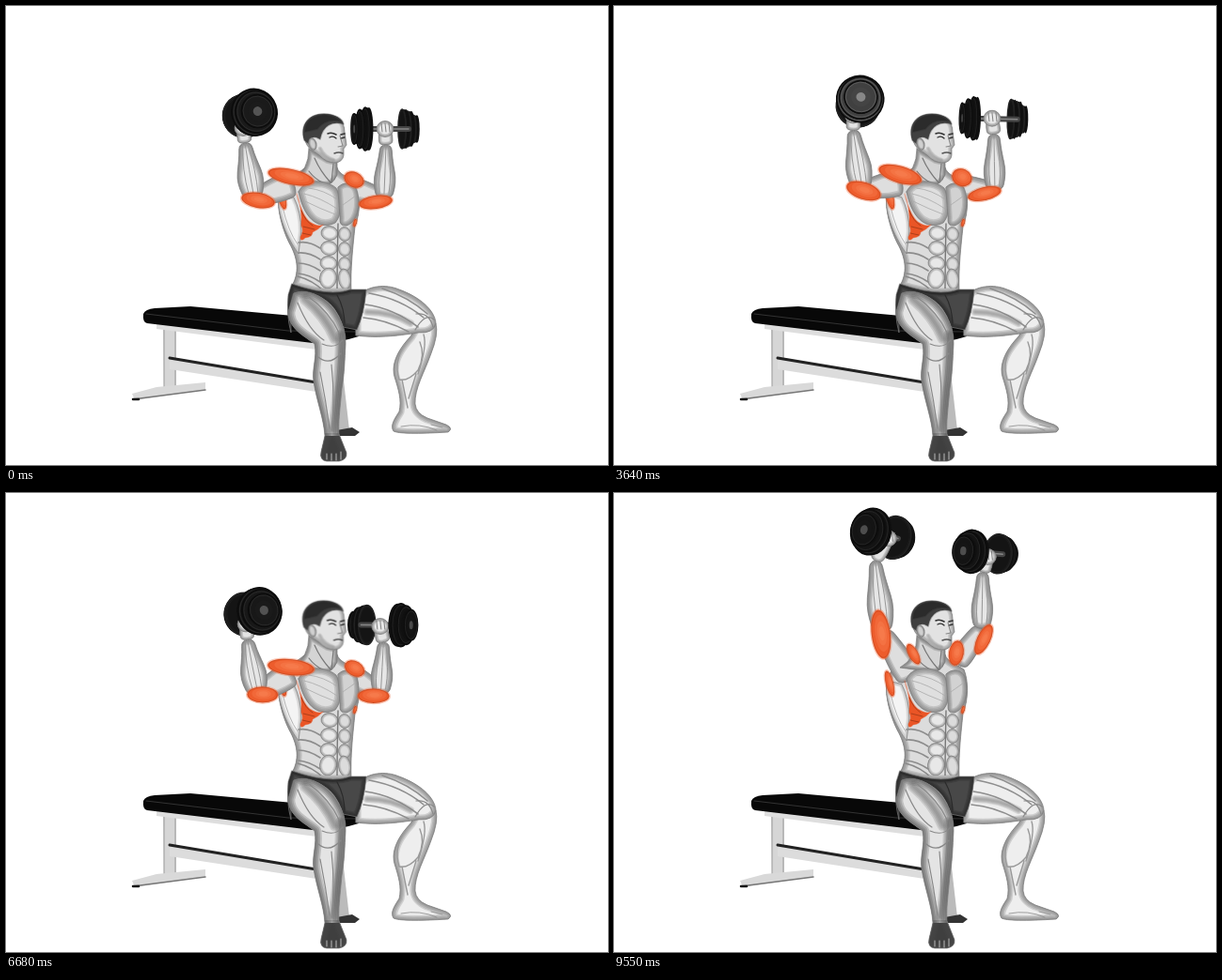
Write an HTML page with a canvas that moves like this. It is 640 by 489 pixels and loops after 9680 ms.

```html
<!DOCTYPE html>
<html lang="en">
<head>
<meta charset="utf-8">
<title>Seated dumbbell press</title>
<style>
html, body { margin: 0; width: 100%; height: 100%; overflow: hidden; background: #fff; }
canvas { display: block; width: 640px; height: 489px; }
</style>
</head>
<body>
<canvas id="stage" width="640" height="489"></canvas>
<script>
const W = 640, H = 489, LOOP = 9680, REP = 6845, STEPS = 99;
const stage = document.getElementById('stage').getContext('2d');
let g = stage;

// ---------- drawing helpers ----------
function layer(draw) {
  const c = document.createElement('canvas');
  c.width = W; c.height = H;
  g = c.getContext('2d');
  draw();
  g = stage;
  return c;
}

const toPath = p => typeof p === 'string' ? new Path2D(p) : p;

function line(p, color = '#888', width = 1) {
  g.strokeStyle = color;
  g.lineWidth = width;
  g.lineCap = g.lineJoin = 'round';
  g.stroke(toPath(p));
}

// Stroke that fades towards its sides.
function shade(p, color, width) {
  const path = toPath(p);
  g.globalAlpha = 0.24;
  for (const k of [1.6, 1.2, 0.8, 0.4]) line(path, color, width * k);
  g.globalAlpha = 1;
}

function fill(p, color, soft = 0) {
  const path = toPath(p);
  g.fillStyle = color;
  g.fill(path);
  if (soft) {
    g.globalAlpha = 0.35;
    line(path, color, soft * 2);
    g.globalAlpha = 1;
  }
}

// Light volume with soft dark edges; extra() paints inside the outline.
function muscle(p, base = '#ececec', edge = '#6d6d6d', width = 7, extra) {
  const path = toPath(p);
  fill(path, base);
  g.save();
  g.clip(path);
  if (extra) extra();
  shade(path, edge, width);
  g.restore();
  line(path, '#777', 0.7);
}

function oval(x, y, rx, ry, deg = 0) {
  const p = new Path2D();
  p.ellipse(x, y, rx, ry, deg * Math.PI / 180, 0, Math.PI * 2);
  return p;
}

function smooth(pts) {
  const p = new Path2D(), n = pts.length;
  const mid = (a, b) => [(a[0] + b[0]) / 2, (a[1] + b[1]) / 2];
  p.moveTo(...mid(pts[n - 1], pts[0]));
  pts.forEach((q, i) => p.quadraticCurveTo(...q, ...mid(q, pts[(i + 1) % n])));
  p.closePath();
  return p;
}

function limb(a, b, radii) {
  const dx = b[0] - a[0], dy = b[1] - a[1], len = Math.hypot(dx, dy) || 1;
  const side = s => radii.map((r, i) => {
    const k = i / (radii.length - 1);
    return [a[0] + dx * k - s * dy / len * r, a[1] + dy * k + s * dx / len * r];
  });
  return smooth([...side(1), ...side(-1).reverse()]);
}

function flame(x, y, rx, ry, deg) {
  fill(oval(x, y, rx, ry, deg), '#ed5c2c', 1.3);
  for (const k of [0.75, 0.5, 0.3]) {
    fill(oval(x + 1, y - 1, rx * k, ry * k, deg), 'rgba(255,150,105,.22)');
  }
  line(oval(x, y, rx * 0.95, ry * 0.95, deg), 'rgba(150,50,20,.4)', 0.8);
}

// ---------- still parts ----------
function bench() {
  fill('M167 341 L181 342 L181 408 L168 409Z', '#d6d6d6');
  line('M168 341 V409 M180 342 V408', '#9a9a9a', 1);
  fill('M174 374 L330 400 L330 411 L174 387Z', '#dcdcdc');
  line('M174 375 L330 401', '#222', 3);
  fill('M134 413 L160 406 L212 401 L212 409 L137 420Z', '#d9d9d9');
  line('M135 419 L212 409', '#777', 1.5);
  line('M135 419 L141 419', '#111', 2.5);
  fill('M340 355 L354 355 L365 452 L353 455Z', '#bbb');
  fill('M346 453 L368 449 L376 454 L371 458 L348 458Z', '#333');
  fill('M160 338 L330 358 L330 366 L160 344Z', '#dedede');
  fill('M146 328 Q148 323 158 322 L196 320 L305 330 L375 342 L375 352 Q350 360 326 359 L150 338 Q145 337 146 328Z', '#080808');
  line('M149 328 L300 346 L372 347', '#333', 1);
}

function farLeg() {
  muscle('M430 352 C418 365 409 380 413 395 C417 408 421 420 418 432 C413 440 408 447 412 453 Q420 457 470 454 Q476 450 468 446 L448 439 Q436 434 435 424 C434 408 445 390 452 370 Q460 350 457 338 L440 335Z', '#eee');
  line('M424 360 Q412 378 418 398 Q428 400 438 388 Q446 372 440 358 M421 398 L427 428 M436 392 L428 418 M444 350 Q448 362 438 392', '#999', 1.4);
  line('M452 446 L464 449 M420 448 Q440 444 458 452', '#888', 0.8);
  muscle('M372 310 C385 297 404 296 418 302 C440 310 456 324 457 338 Q455 349 438 348 C414 352 392 354 372 351Z', '#eee');
  line('M386 306 Q420 312 444 332 M382 318 Q412 322 438 342 M380 332 Q404 334 428 347 M400 301 Q428 310 448 328', '#8e8e8e', 1.6);
  shade('M384 326 Q410 326 430 338', '#888', 5);
  line('M435 345 Q446 326 455 334 M436 328 Q450 326 454 342', '#8a8a8a', 1.2);
}

function nearLeg() {
  muscle('M306 306 C320 300 342 310 352 328 Q362 344 361 360 C360 378 360 390 357 408 C355 430 353 445 354 456 L362 476 Q363 483 354 485 L341 485 Q333 484 335 475 L339 458 C338 440 330 420 327 400 C325 386 331 374 328 360 C318 352 300 344 300 326Z', '#e4e4e4', '#4a4a4a', 9, () => {
    fill('M336 458 H358 L366 490 H330Z', '#3f3f3f', 3);
    shade('M355 350 Q354 400 347 452', '#777', 6);
    shade('M318 312 Q340 330 350 354', '#777', 8);
  });
  line('M310 316 Q322 346 338 356 M322 310 Q344 326 354 348 M332 374 Q344 384 356 370 M336 360 Q350 366 358 356 M334 390 Q340 420 344 450 M346 382 Q350 420 346 452', '#888', 1.2);
  line('M341 477 V483 M346 477 V484 M351 477 V484 M356 475 V483', '#bbb', 1);
}

function shorts() {
  muscle('M304 296 Q344 310 366 302 L383 302 Q381 328 373 345 L358 342 Q352 318 332 309 Q318 305 308 316 Q302 330 303 348 Q298 330 300 308Z', '#484848', '#222', 6);
  line('M352 308 Q360 322 360 340 M304 298 Q344 312 366 304', '#2a2a2a', 1.2);
}

function trunk() {
  muscle('M322 168 C312 180 298 182 291 196 C286 212 294 240 303 256 C310 270 312 284 304 298 Q340 310 367 304 C366 280 369 255 371 235 C377 220 377 200 372 188 C364 182 354 180 352 172Z', '#dcdcdc');
  muscle('M290 200 C287 216 296 244 311 264 L314 240 Q314 220 306 204Z', '#f4f4f4', '#aaa', 4);
  line('M294 214 Q300 240 310 254', '#b5b5b5', 1);
  flame(293, 203, 4, 14, -14);
}

function chest() {
  muscle('M322 152 L342 164 L352 166 L352 180 Q346 194 334 190 L304 186 Q322 176 322 152Z', '#d4d4d4', '#666', 5);
  line('M328 162 Q334 176 345 188 M348 168 L346 188 M322 176 Q328 184 338 189', '#777', 1.2);
  muscle('M311 198 C316 184 340 184 351 194 C357 204 358 222 350 231 C336 238 318 232 311 198Z', '#dfdfdf', '#707070', 8);
  muscle('M353 193 C360 186 372 187 374 200 C377 216 372 231 362 234 Q354 235 355 226Z', '#d2d2d2', '#707070', 6);
  line('M317 200 Q334 204 352 216 M318 208 Q334 216 350 222 M322 194 Q338 196 352 206 M358 212 L372 202', '#aaa', 0.8);
  for (let i = 0; i < 4; i++) {
    const y = 242 + i * 16, h = i === 3 ? 11 : 7.5;
    muscle(oval(344 - i * 0.5, y, 9, h, 8), '#e8e8e8', '#8c8c8c', 3.5);
    muscle(oval(360, y + 1, 6.5, h, -8), '#dcdcdc', '#8c8c8c', 3);
  }
  line('M353 232 Q352 268 352 304', '#777', 1.4);
  for (let i = 0; i < 4; i++) {
    line(`M311 ${252 + i * 11} Q322 ${250 + i * 12} 334 ${258 + i * 12}`, '#8c8c8c', 1.6);
  }
  line('M310 288 Q326 292 338 304', '#888', 1.5);
  fill('M309 200 Q315 224 323 230 Q332 236 337 233 Q332 238 326 241 Q326 246 318 247 Q313 252 313 246 Q317 240 314 234 Q315 216 309 200Z', '#ea5526', 0.6);
  line('M316 235 L328 238 M315 242 L324 244 M314 218 Q318 229 326 234', '#a83b18', 0.9);
  flame(371, 231, 1.6, 4, 15);
}

function head() {
  muscle('M317 140 C314 126 322 115 338 115 C352 115 360 123 360 134 L362 148 L359 152 L359 159 Q358 166 350 167 Q340 167 333 159 L326 154 Q319 150 317 140Z', '#e2e2e2', '#888', 5);
  fill('M317 143 C312 126 322 115 338 115 C350 115 358 120 359 126 Q350 123 343 127 Q336 131 334 142 L330 140 Q323 138 322 147Z', '#404040', 0.8);
  fill('M318 134 C318 121 328 116 340 116 Q351 117 356 123 Q340 119 331 131Z', '#2b2b2b', 1);
  muscle(oval(326, 147, 4, 6.5, -15), '#d0d0d0', '#777', 2.5);
  line('M342 136 Q346 134 351 137 M356 137 L360 136', '#333', 1.6);
  line('M344 140 Q348 138 351 141 M356 141 L360 140', '#333', 1.3);
  line('M355 138 L358 149 L353 150', '#888', 1.1);
  line('M349 157 Q354 155 358 157', '#555', 1.4);
  shade('M334 152 Q338 161 348 164', '#999', 3);
}

const back = layer(() => { bench(); trunk(); farLeg(); shorts(); nearLeg(); });
const front = layer(() => {
  chest();
  g.clearRect(290, 301, 100, 60);
});
const skull = layer(head);

// ---------- moving arms ----------
// Six poses from the bottom to the top of the press.
// joints: shoulder, elbow, wrist, hand; ends: two plate stacks
// patches: shoulder and triceps as x, y, rx, ry, angle
const left = {
  radius: [25, 23],
  joints: [
    [300, 200, 281, 247, 266, 192, 266, 172],
    [306, 189, 263, 205, 254, 146, 252, 130],
    [306, 188, 263, 197, 254, 134, 254, 118],
    [318, 188, 274, 172, 261, 102, 266, 82],
    [316, 198, 285, 150, 276, 74, 290, 50],
    [314, 202, 290, 140, 287, 64, 299, 40]
  ],
  ends: [
    [291, 169, 254, 170], [265, 113, 251, 118], [262, 100, 258, 109],
    [260, 66, 278, 75], [270, 42, 300, 50], [278, 33, 312, 41]
  ],
  patches: [
    [303, 198, 25, 10, -15, 289, 242, 10, 11, -120],
    [303, 182, 25, 8, 12, 268, 207, 8, 18, -80],
    [304, 180, 24, 9, 15, 265, 198, 9, 19, -75],
    [310, 171, 18, 8, 42, 273, 174, 11, 17, -18],
    [318, 172, 12, 5, 60, 283, 152, 10, 26, -10],
    [320, 170, 12, 5, 70, 288, 143, 10, 27, 6]
  ],
  shine: [26, 34, 88, 30, 26, 30]
};
const right = {
  radius: [23, 21],
  joints: [
    [374, 200, 387, 245, 392, 198, 380, 180],
    [368, 194, 402, 205, 404, 148, 403, 131],
    [368, 192, 405, 198, 404, 138, 402, 121],
    [364, 188, 402, 170, 402, 108, 401, 92],
    [364, 182, 392, 146, 393, 86, 398, 69],
    [364, 180, 386, 136, 387, 78, 394, 63]
  ],
  ends: [
    [372, 173, 404, 174], [379, 131, 428, 131], [379, 121, 429, 122],
    [380, 91, 425, 92], [378, 64, 414, 67], [376, 53, 409, 56]
  ],
  patches: [
    [373, 194, 12, 7, 45, 383, 241, 10, 13, 120],
    [370, 185, 11, 8, 25, 393, 209, 7, 18, 82],
    [370, 183, 11, 9, 25, 394, 201, 7, 18, 78],
    [367, 176, 10, 11, 40, 394, 179, 7, 18, 52],
    [364, 171, 8, 13, 10, 394, 157, 7, 17, 25],
    [363, 168, 7, 15, 8, 388, 151, 7, 19, 28]
  ],
  shine: [26, 24, 24, 26, 26, 30]
};

// time in ms, pose
const path = [
  [0, 1], [250, 2], [700, 3], [980, 3.6], [1220, 4.2], [1500, 4.8], [1750, 5],
  [2150, 5], [2450, 4.6], [2710, 4], [2940, 3.5], [3130, 3], [3640, 2],
  [3820, 1], [4100, 0.6], [4500, 0.2], [4900, 0], [5700, 0], [6100, 0.15],
  [6410, 0.5], [REP, 1]
];

function poseAt(t) {
  const i = path.findIndex(k => k[0] > t);
  const [t0, a] = path[i - 1], [t1, b] = path[i];
  return a + (b - a) * (t - t0) / (t1 - t0);
}

function mix(rows, q) {
  const i = Math.min(4, Math.floor(q)), k = q - i;
  const lerp = (a, b) => a + (b - a) * k;
  return Array.isArray(rows[0])
    ? rows[i].map((v, j) => lerp(v, rows[i + 1][j]))
    : lerp(rows[i], rows[i + 1]);
}

// One stack of plates; (ux, uy) is the outward axis in the picture plane.
function plates([x, y], [ux, uy], r, near, lum) {
  const f = Math.min(0.985, Math.hypot(ux, uy));
  const thin = Math.sqrt(1 - f * f), turn = Math.atan2(uy, ux) * 180 / Math.PI;
  const gray = v => `rgb(${Math.round(v)},${Math.round(v)},${Math.round(v)})`;
  const at = (o, k) => oval(x + ux * o, y + uy * o, r * k * thin, r * k, turn);
  const stack = [[-7, 1], [-1, 0.9], [5, 0.7]];
  if (!near) stack.reverse();
  for (const [o, k] of stack) {
    for (let s = 0; s <= 4; s += 2) fill(at(o + (near ? s : 4 - s), k), '#101010');
    const top = o + (near ? 4 : 0), face = at(top, k);
    fill(face, gray(near ? lum * 0.75 : 20));
    line(face, gray(near ? 12 : 34), 1.6);
    line(at(top, k * 0.92), gray(near ? lum + 18 : 32), 0.7);
  }
  if (near) {
    fill(at(9, 0.42), gray(lum * 0.8));
    fill(at(9, 0.2), gray(lum + 50));
  }
}

function upperArm(arm, q) {
  const j = mix(arm.joints, q);
  const size = arm === left ? [13, 14, 13, 11, 9] : [11, 12, 11, 10, 8];
  muscle(limb(j.slice(0, 2), j.slice(2, 4), size), '#dedede', '#6b6b6b', 7);
}

function foreArm(arm, q) {
  const j = mix(arm.joints, q), e = mix(arm.ends, q), p = mix(arm.patches, q);
  const lum = mix(arm.shine, q);
  let a = e.slice(0, 2), b = e.slice(2);
  if (arm === right && q < 1) [a, b] = [b, a];
  const u = [(a[0] - b[0]) / 50, (a[1] - b[1]) / 50];
  const elbow = j.slice(2, 4), wrist = j.slice(4, 6), hand = j.slice(6);

  flame(...p.slice(0, 5));
  plates(b, [-u[0], -u[1]], arm.radius[1], false, lum);
  line(`M${a} L${b}`, '#444', 6);
  line(`M${a} L${b}`, '#888', 1.5);

  muscle(limb(wrist, hand, [7, 7.5, 6]), '#e4e4e4', '#777', 4);
  const size = arm === left ? [9, 13, 14, 11, 8, 6.5] : [8, 11, 11.5, 9, 7, 6];
  muscle(limb(elbow, wrist, size), '#e6e6e6', '#626262', 7);
  const [ex, ey] = elbow, [wx, wy] = wrist;
  for (const s of [-5, 0, 5]) {
    line(`M${ex + s} ${ey - 5} Q${(ex + wx) / 2 + s * 1.5} ${(ey + wy) / 2} ${wx + s * 0.5} ${wy}`, '#969696', 1);
  }
  muscle(oval(hand[0], hand[1], 9, 8.5), '#e8e8e8', '#777', 4);
  for (let i = -1; i < 2; i++) {
    line(`M${hand[0] + i * 4} ${hand[1] - 6} l1 9`, '#777', 0.9);
  }
  flame(...p.slice(5));
  plates(a, u, arm.radius[0], true, lum);
}

function render(t) {
  const q = poseAt(t % REP), low = Math.max(0, 1 - q);
  g.fillStyle = '#fff';
  g.fillRect(0, 0, W, H);
  g.drawImage(back, 0, 0);
  upperArm(right, q);
  upperArm(left, q);
  g.drawImage(front, 0, 0);
  foreArm(right, q);
  foreArm(left, q);
  g.drawImage(skull, -2 * low, -low);
}

// Redraw only when the stepped clock moves on.
const start = performance.now();
let shown = -1;
function tick() {
  const now = Math.max(0, performance.now() - start) % LOOP;
  const step = Math.floor(now / LOOP * STEPS);
  if (step !== shown) {
    shown = step;
    render(step * LOOP / STEPS);
  }
  requestAnimationFrame(tick);
}
tick();
</script>
</body>
</html>
```
